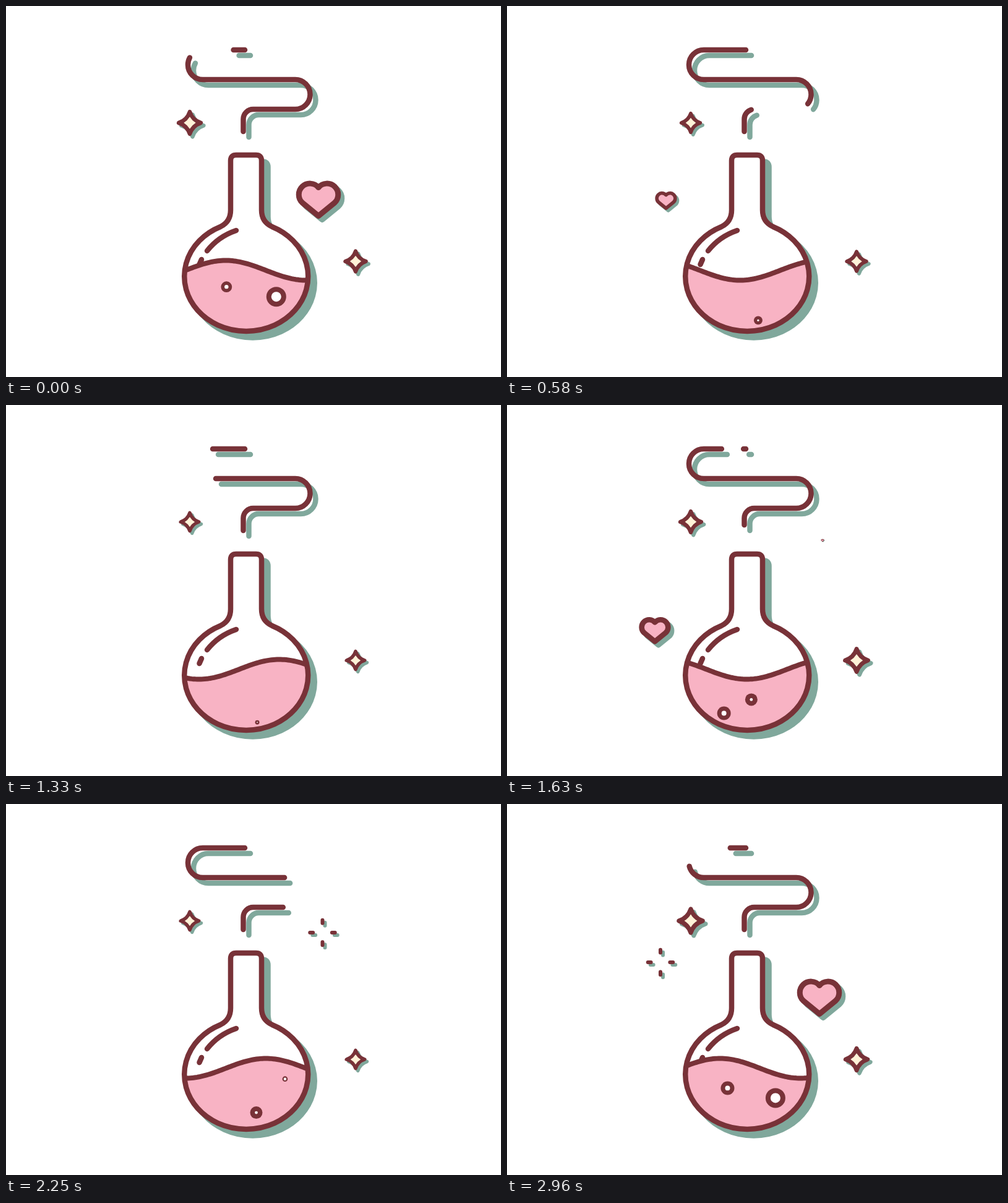
Write an HTML page with a canvas that moves like this. It is 800x600 px and loops after 3.08 s.

```html
<!DOCTYPE html>
<html>
<head>
<meta charset="utf-8">
<title>Love potion</title>
<style>
html, body { margin: 0; width: 100%; height: 100%; overflow: hidden; background: #fff; }
canvas { display: block; }
</style>
</head>
<body>
<canvas id="stage" width="800" height="600"></canvas>
<script>
const ctx = document.getElementById('stage').getContext('2d');
const DARK = '#783238', TEAL = '#80a89c', PINK = '#f8b3c4', CREAM = '#fff2d8';
const LOOP = 3080, CYCLE = 3000, FRAMES = 72, STEP = CYCLE / FRAMES;
const LINE = 8.5;

const flask = new Path2D('M363 330V250Q363 241 372 241H404Q413 241 413 250V330' +
  'Q413 349 430 357A100 88.5 0 1 1 346.5 357Q363 349 363 330Z');
const shine = new Path2D('M372 363Q343 373 325 396M316 410L312.5 418');
const smoke = new Path2D('M383.5 203V183A16 16 0 0 1 399.5 167H467.5' +
  'A24 24 0 0 0 467.5 119H318A24 24 0 0 1 318 71H386');
const SMOKE_LEN = 481;
const heart = new Path2D('M0 -20A18 18 0 1 0 -26 4.8L0 26L26 4.8A18 18 0 1 0 0 -20Z');
const star = new Path2D('M0 -16Q4 -4 16 0Q4 4 0 16Q-4 4 -16 0Q-4 -4 0 -16Z');

const stars = [{ x: 297, y: 189, peak: 840 }, { x: 565, y: 413, peak: 800 }];
const pulses = [11, 23, 16];

const hearts = [
  { x: 257, y: 315, width: 58, start: 475 },
  { x: 239, y: 365, width: 54, start: 1365 },
  { x: 246.5, y: 267, width: 57, start: 2318 },
  { x: 513, y: 258, width: 67, start: 640 },
  { x: 510, y: 219, width: 50, start: 1610 },
  { x: 505, y: 313.5, width: 73, start: 2560 }
];

const bubbles = [
  { x: 353.5, y: 513, drift: 0, sway: -3, r: 11, hole: .36, starts: [700, 1510, 2533] },
  { x: 406, y: 518, drift: -.03, sway: 3, r: 10, hole: .24, starts: [507, 1295, 2100] },
  { x: 413, y: 513, drift: .07, sway: 0, r: 16, hole: .5, starts: [743, 1708, 2660] }
];
const BUBBLE_LIFE = 580, BUBBLE_SPEED = .126;

const mod = (v, n) => (v % n + n) % n;
const clamp = v => Math.max(0, Math.min(1, v));
const easeOut = p => 1 - (1 - p) ** 3;
const easeInOut = p => p ** 1.6 / (p ** 1.6 + .89 * (1 - p) ** 1.6);

function at(x, y, scale, draw) {
  ctx.save();
  ctx.translate(x, y);
  ctx.scale(scale, scale);
  draw();
  ctx.restore();
}

function shape(path, width, stroke, fill) {
  ctx.lineWidth = width;
  ctx.strokeStyle = stroke;
  if (fill) {
    ctx.fillStyle = fill;
    ctx.fill(path);
  }
  ctx.stroke(path);
}

function shadowed(path, width, fill, offset) {
  at(offset, offset, 1, () => shape(path, width, TEAL, fill && TEAL));
  shape(path, width, DARK, fill);
}

function disc(x, y, r, color) {
  ctx.fillStyle = color;
  ctx.beginPath();
  ctx.arc(x, y, r, 0, Math.PI * 2);
  ctx.fill();
}

// A gap opens at the nozzle every 1500 ms and travels up the smoke
function gapAt(age) {
  const low = clamp((age - 420) / 1295) ** 1.2;
  const high = easeInOut(clamp(age / 1720));
  return [low * SMOKE_LEN, high * SMOKE_LEN];
}

function drawSmoke(t) {
  const age = t % 1500;
  const edges = [0, ...gapAt(age), ...gapAt(age + 1500), SMOKE_LEN];
  for (const [offset, color] of [[9, TEAL], [0, DARK]]) {
    at(offset, offset, 1, () => {
      for (let i = 0; i < edges.length; i += 2) {
        const length = edges[i + 1] - edges[i];
        if (length < .5) continue;
        ctx.setLineDash([length, 999]);
        ctx.lineDashOffset = -edges[i];
        shape(smoke, LINE, color);
      }
    });
  }
}

function drawBubble(b, t) {
  for (const start of b.starts) {
    const age = mod(t - start, CYCLE);
    if (age >= BUBBLE_LIFE) continue;
    const x = b.x + b.drift * age + b.sway * Math.sin(age / BUBBLE_LIFE * Math.PI * 2);
    const y = b.y - BUBBLE_SPEED * age;
    const r = b.r * Math.min(1, age / 110, (BUBBLE_LIFE - age) / 140);
    disc(x, y, r, DARK);
    disc(x, y, r * b.hole, '#fff');
  }
}

function drawFlask(t) {
  at(10.5, 10.5, 1, () => shape(flask, LINE, TEAL, TEAL));
  ctx.fillStyle = '#fff';
  ctx.fill(flask);
  shape(shine, LINE, DARK);

  ctx.save();
  ctx.clip(flask);
  const liquid = new Path2D();
  const crest = 355 + .26 * t;
  liquid.moveTo(270, 560);
  for (let x = 270; x <= 510; x += 3) {
    liquid.lineTo(x, 427.5 - 16 * Math.cos((x - crest) / 260 * Math.PI * 2));
  }
  liquid.lineTo(510, 560);
  shape(liquid, 8, DARK, PINK);
  for (const b of bubbles) drawBubble(b, t);
  ctx.restore();

  shape(flask, LINE, DARK);
}

function drawStar(s, t) {
  const phase = (t - s.peak) / 1000;
  const pulse = pulses[mod(Math.round(phase), pulses.length)];
  const width = 35 + pulse * Math.cos(phase * Math.PI) ** 6;
  at(s.x, s.y, width / 38, () => shadowed(star, 6, CREAM, 4));
}

// Hearts swell, then pop into four short rays
function drawHeart({ x, y, width, start }, t) {
  const age = mod(t - start, CYCLE);
  const burst = (age - 540) / 150;
  if (burst < 0) {
    const size = (width - 9) / 64;
    const grown = easeOut(clamp(age / 400));
    if (grown > 0) at(x, y, size * grown, () => shadowed(heart, 9 / size, PINK, 6 / size));
  } else if (burst < .9) {
    const inner = 23 * burst, outer = 21 * easeOut(burst);
    const rays = new Path2D();
    for (let a = 0; a < 4; a++) {
      const dx = Math.cos(a * Math.PI / 2), dy = Math.sin(a * Math.PI / 2);
      rays.moveTo(dx * inner, dy * inner);
      rays.lineTo(dx * outer, dy * outer);
    }
    at(x + 1.5, y - 11, 1, () => shadowed(rays, 6, null, 4));
  }
}

function render(now) {
  const index = Math.min(FRAMES - 1, Math.floor((now % LOOP + 5) / STEP));
  const t = index * STEP;
  ctx.clearRect(0, 0, 800, 600);
  ctx.lineCap = ctx.lineJoin = 'round';
  drawSmoke(t);
  drawFlask(t);
  for (const s of stars) drawStar(s, t);
  for (const h of hearts) drawHeart(h, t);
}

const begin = performance.now();
function tick() {
  render(performance.now() - begin);
  requestAnimationFrame(tick);
}
tick();
</script>
</body>
</html>
```
